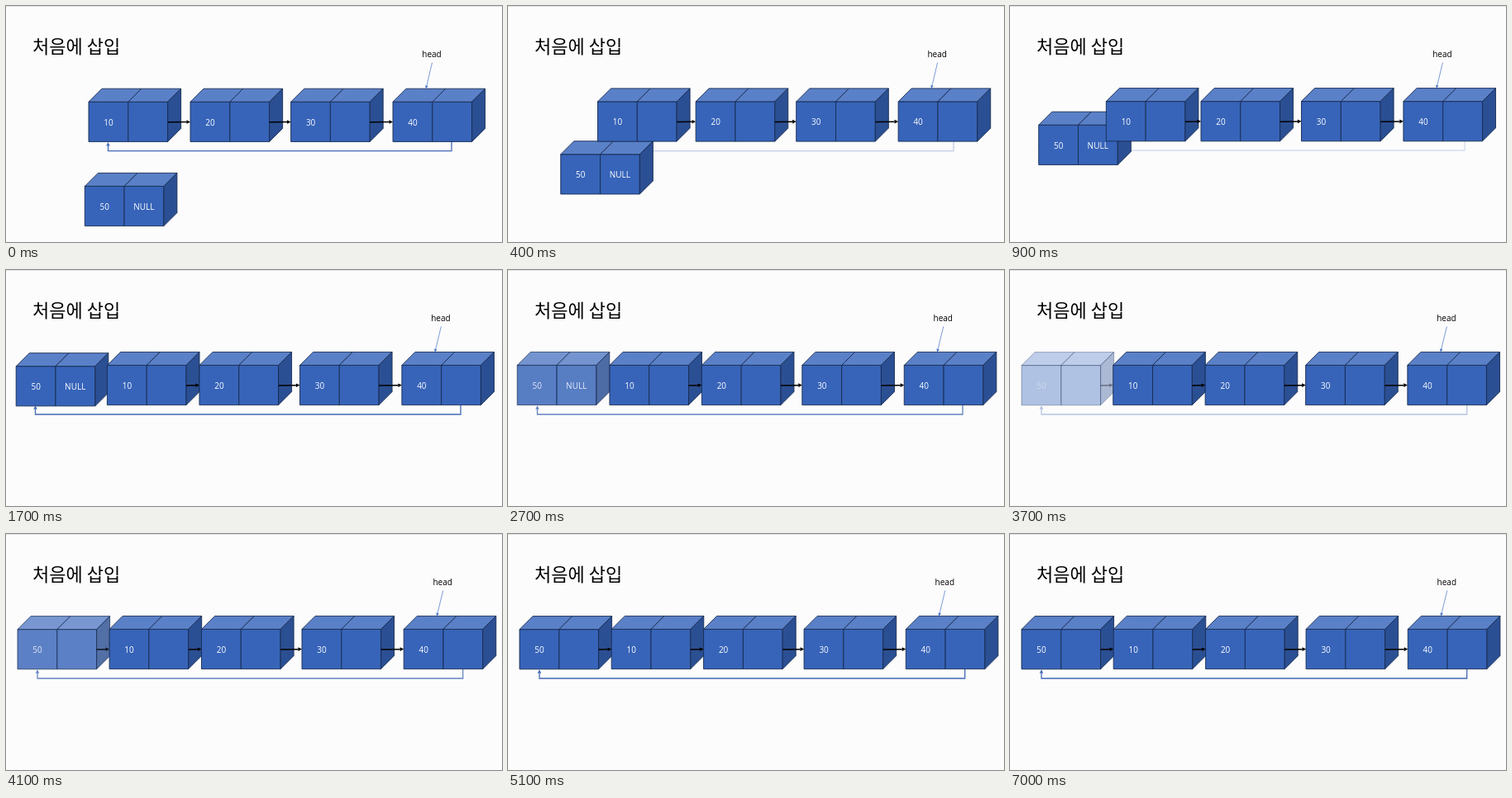
Animation, 600 px wide and 286 px high, one loop 7100 ms. Source, as an HTML page with a canvas:

```html
<!DOCTYPE html>
<html lang="ko">
<head>
<meta charset="utf-8">
<title>처음에 삽입</title>
<style>
html, body { margin: 0; width: 100%; height: 100%; overflow: hidden; background: #fcfcfc; }
canvas { display: block; width: 600px; height: 286px; }
</style>
</head>
<body>
<canvas id="stage"></canvas>
<script>
const W = 600, H = 286, LOOP = 7100, STEP = 100;
const MORPH = 1910, SECOND = 2600;
const CELL = 47.8, TALL = 48.2, DEPTH = 16;
const FRONT = '#3764b9', TOP = '#5a80c8', SIDE = '#2b4f93', EDGE = '#172c51', LINK = '#4169b4';
const LABEL = '10px "Open Sans", "Noto Sans", sans-serif';
const TITLE = '300 22px "Noto Sans CJK KR", "Noto Sans CJK", sans-serif';

// Left edge of each list node on the three slides
const NODES = [
  { label: '10', x: [100, 122.7, 125.2] },
  { label: '20', x: [223, 234.1, 236.6] },
  { label: '30', x: [344.6, 355.6, 358.1] },
  { label: '40', x: [468, 479, 481.3] }
];

const canvas = document.getElementById('stage');
const ctx = canvas.getContext('2d');
const ratio = window.devicePixelRatio || 1;
canvas.width = W * ratio;
canvas.height = H * ratio;

const clamp = v => Math.max(0, Math.min(1, v));
const lerp = (a, b, p) => a + (b - a) * p;
const ease = u => 1 - (1 - u) ** 2;
const fadeOut = u => clamp(1 - u / 0.31);
const fadeIn = u => clamp((u - 0.27) / 0.6) ** 1.4;

function trace(points, closed) {
  ctx.beginPath();
  points.forEach(([x, y]) => ctx.lineTo(x, y));
  if (closed) ctx.closePath();
}

function face(color, ...points) {
  trace(points, true);
  ctx.fillStyle = color;
  ctx.fill();
  ctx.strokeStyle = EDGE;
  ctx.lineWidth = 0.9;
  ctx.stroke();
}

function text(str, x, y, color, font = LABEL, align = 'center') {
  ctx.font = font;
  ctx.textAlign = align;
  ctx.textBaseline = 'alphabetic';
  ctx.fillStyle = color;
  ctx.fillText(str, x, y);
}

function arrow(points, color, width, size) {
  const [x, y] = points[points.length - 1];
  const [px, py] = points[points.length - 2];
  const len = Math.hypot(x - px, y - py);
  const dx = (x - px) / len, dy = (y - py) / len;
  const bx = x - dx * size, by = y - dy * size, half = size / 2;
  trace([...points.slice(0, -1), [bx, by]]);
  ctx.strokeStyle = color;
  ctx.lineWidth = width;
  ctx.stroke();
  trace([[x, y], [bx - dy * half, by + dx * half], [bx + dy * half, by - dx * half]], true);
  ctx.fillStyle = color;
  ctx.fill();
}

function node(x, y, left, right = '') {
  for (let i = 0; i < 2; i++) {
    const a = x + i * CELL, b = a + CELL;
    face(FRONT, [a, y], [b, y], [b, y + TALL], [a, y + TALL]);
    face(TOP, [a, y], [a + DEPTH, y - DEPTH], [b + DEPTH, y - DEPTH], [b, y]);
  }
  const e = x + 2 * CELL;
  face(SIDE, [e, y], [e + DEPTH, y - DEPTH], [e + DEPTH, y + TALL - DEPTH], [e, y + TALL]);
  text(left, x + 24, y + 28.3, '#fff');
  text(right, x + 71.5, y + 28.3, '#fff');
}

function returnLink(from, to, y) {
  arrow([[from, y], [from, y + 11.3], [to, y + 11.3], [to, y + 0.6]], LINK, 1.3, 4.5);
}

function nextLink(from, to, y) {
  arrow([[from + 2 * CELL, y + 24.6], [to, y + 24.2]], '#000', 1.5, 4.6);
}

function withAlpha(alpha, paint) {
  if (alpha <= 0) return;
  ctx.globalAlpha = alpha;
  paint();
  ctx.globalAlpha = 1;
}

function draw(t) {
  const u1 = clamp(t / MORPH), u2 = clamp((t - SECOND) / MORPH);
  const p1 = ease(u1), p2 = ease(u2);
  const y = lerp(116.2, 115.4, p1);
  const xs = NODES.map(n => lerp(lerp(n.x[0], n.x[1], p1), n.x[2], p2));

  ctx.setTransform(ratio, 0, 0, ratio, 0, 0);
  ctx.fillStyle = '#fcfcfc';
  ctx.fillRect(0, 0, W, H);
  ctx.fillStyle = '#e2e2e2';
  ctx.fillRect(0, 0, W, 1);
  text('처음에 삽입', 32, 56.5, '#000', TITLE, 'left');

  withAlpha(fadeOut(u1), () => returnLink(539, 123.5, 164.3));
  withAlpha(fadeIn(u1) * fadeOut(u2), () => returnLink(550, 35.5, 163.7));
  withAlpha(fadeIn(u2), () => returnLink(552.7, 38, 163.7));

  withAlpha(fadeOut(u2), () => node(lerp(95.3, 11.2, p1), lerp(218.4, 115.4, p1), '50', 'NULL'));
  withAlpha(fadeIn(u2), () => node(14, 115.6, '50'));
  NODES.forEach((n, i) => node(xs[i], y, n.label));
  for (let i = 0; i < 3; i++) nextLink(xs[i], xs[i + 1], y);
  withAlpha(fadeIn(u2), () => nextLink(14, xs[0], y));

  const head = xs[3];
  text('head', head + 47, 62.4, '#000');
  arrow([[head + 47.5, 68.5], [head + 40, y - DEPTH]], '#4472c4', 0.7, 3.6);
}

function tick(now) {
  const t = now % LOOP;
  draw(Math.floor(t / STEP) * STEP);
  requestAnimationFrame(tick);
}

draw(0);
requestAnimationFrame(tick);
</script>
</body>
</html>
```
